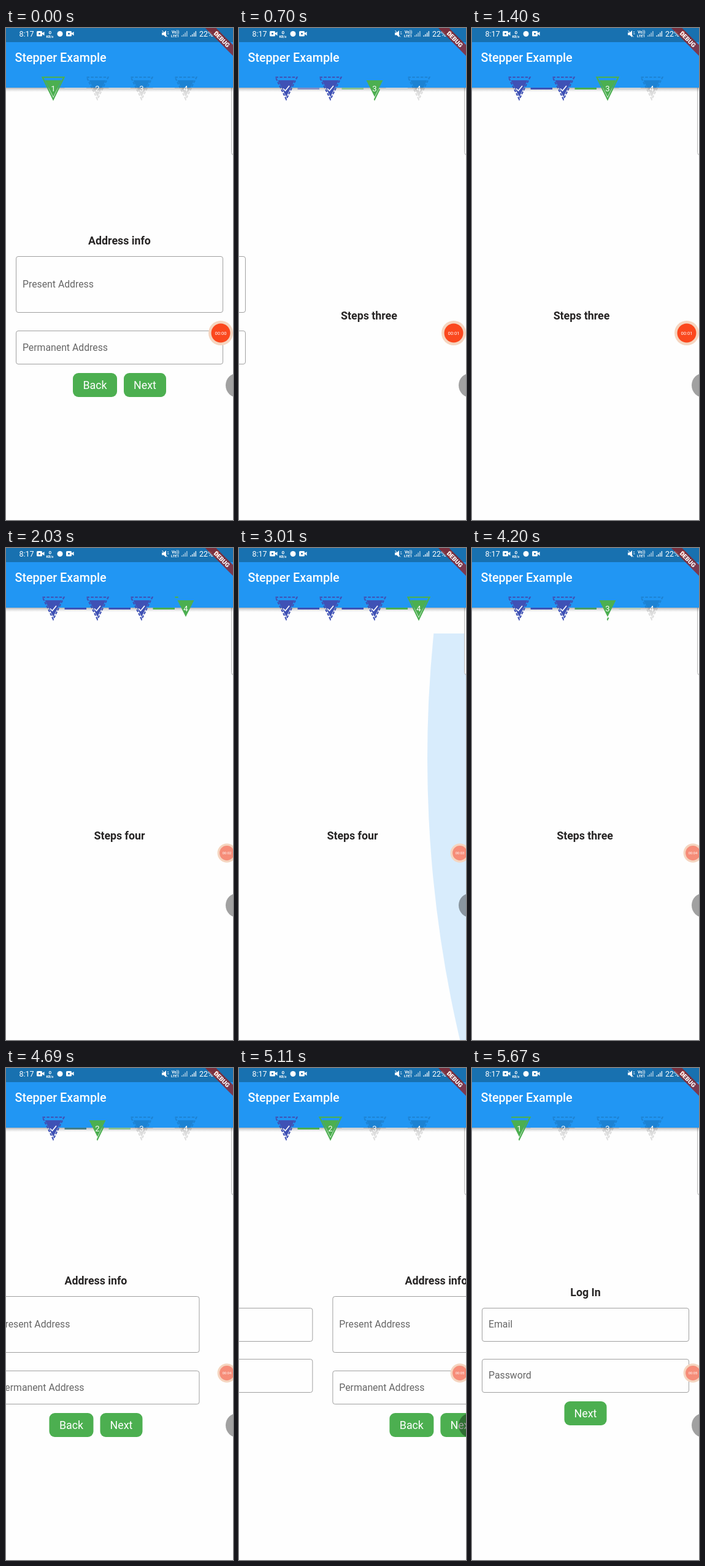
An HTML page that plays this animation: 370 by 800 pixels, repeating every 5.74 s.

```html
<!DOCTYPE html>
<html lang="en">
<head>
<meta charset="utf-8">
<title>Stepper Example</title>
<style>
html, body { margin: 0; width: 100%; height: 100%; overflow: hidden; background: #fefefe; }
svg { display: block; width: 370px; height: 800px; font-family: Roboto, sans-serif; }
.head { font-size: 17.8px; font-weight: 700; fill: #262424; text-anchor: middle; }
.label { font-size: 15.8px; fill: #666; }
.field { fill: none; stroke: #a0a0a0; }
.btn { fill: #4caf50; }
.btn-text { font-size: 17.8px; fill: #fff; text-anchor: middle; }
.num { font-size: 13px; fill: #fff; text-anchor: middle; }
.tick { fill: none; stroke: #fff; stroke-width: 1.6; }
.status { fill: #fff; font-size: 12.5px; }
.tiny { font-size: 5.5px; font-weight: 700; }
</style>
</head>
<body>
<svg viewBox="0 0 370 800">
  <defs>
    <linearGradient id="shade" x2="0" y2="1">
      <stop offset="0" stop-opacity=".3"/>
      <stop offset=".4" stop-opacity=".13"/>
      <stop offset="1" stop-opacity="0"/>
    </linearGradient>
    <clipPath id="body"><path d="M0 139H370V800H0z"/></clipPath>
    <g id="camera" fill="#fff">
      <rect y="5" width="9" height="8.5" rx="1.5"/>
      <path d="M8 9l4.500-3v6.500z"/>
      <circle cx="4.500" cy="9.200" r="1.500" fill="#1871b0"/>
    </g>
    <path id="bars" d="M0 14v-2h1.500v2zM2.700 14v-4h1.500v4zM5.400 14V7.500h1.500V14zM8.100 14V5h1.500v9z"/>
  </defs>
  <rect width="370" height="800" fill="#fefefe"/>
  <g id="pages"></g>
  <g clip-path="url(#body)"><circle id="glow" cy="342" r="2000" fill="#2196f3"/></g>
  <rect x="367.500" y="80" width="20" height="126.500" rx="4" fill="#fefefe" stroke="#b5b5b5"/>

  <rect y="97" width="370" height="7" fill="url(#shade)"/>
  <rect width="370" height="97" fill="#2196f3"/>
  <rect width="370" height="23" fill="#1871b0"/>
  <text x="14.500" y="55" fill="#fff" font-size="19.700" font-weight="500">Stepper Example</text>
  <g id="stepper"></g>

  <g class="status">
    <text x="21.500" y="14">8:17</text>
    <use href="#camera" x="50"/>
    <text class="tiny" x="69.500" y="9.500" style="font-size:8px">0</text>
    <text class="tiny" x="65.500" y="15.500">KB/s</text>
    <circle cx="88" cy="9.500" r="4.500"/>
    <use href="#camera" x="98"/>
    <path d="M254 7.500h3l4-3.500v11l-4-3.500h-3z"/>
    <path d="M254.500 4l8.500 10.500M263 6.500l2 0M263 9.500h2.500" fill="none" stroke="#fff"/>
    <text class="tiny" x="270" y="9" style="font-size:6.500px">Vo))</text>
    <text class="tiny" x="269" y="15" style="font-size:6px">LTE1</text>
    <use href="#bars" x="286" opacity=".6"/>
    <use href="#bars" x="300.500" opacity=".85"/>
    <text x="315" y="13.500">22%</text>
    <rect x="341" y="5" width="6" height="9.500" rx="1"/>
  </g>
  <g transform="translate(370 0) rotate(45)">
    <rect x="-50" y="19.500" width="100" height="12.500" fill="#961c1c" fill-opacity=".76"/>
    <text y="29.300" fill="#fff" font-size="10" font-weight="900" text-anchor="middle">DEBUG</text>
  </g>

  <circle cx="378" cy="581" r="20" fill="#000" fill-opacity=".37"/>
  <g id="timer">
    <circle r="20" fill="#f5d5c0"/>
    <circle id="dot" r="15.500"/>
    <text id="clock" y="2.700" fill="#fff" font-size="7.600" text-anchor="middle"></text>
  </g>
</svg>
<script>
const LOOP = 5740, TICK = 70, SWIPE = 650, HALF = 295;
const GREEN = [76, 175, 80], INDIGO = [63, 81, 181], GREY = [207, 211, 214];
const $ = id => document.getElementById(id);
const rgb = c => `rgb(${c.map(Math.round)})`;
const clamp = x => Math.min(1, Math.max(0, x));
const mix = (a, b, k) => a.map((v, i) => v + (b[i] - v) * k);

// Start time, direction and resulting step of each swipe
const swipes = [
  [204, 1, 2], [1350, 1, 3], [3596, -1, 2], [4217, -1, 1], [4865, -1, 0]
];

// Piecewise linear track of [time, ...values]
function track(keys, t) {
  if (t <= keys[0][0]) return keys[0].slice(1);
  for (let i = 1; i < keys.length; i++) {
    const [a, ...from] = keys[i - 1], [b, ...to] = keys[i];
    if (t < b) return mix(from, to, (t - a) / (b - a));
  }
  return keys[keys.length - 1].slice(1);
}

const head = (text, y) => `<text class="head" x="185" y="${y}">${text}</text>`;
const field = (label, y, h, base) =>
  `<rect class="field" x="16.500" y="${y + .5}" width="337" height="${h}" rx="3.500"/>` +
  `<text class="label" x="27" y="${base}">${label}</text>`;
const button = (text, x, y, w) =>
  `<rect class="btn" x="${x}" y="${y}" width="${w}" height="39" rx="9"/>` +
  `<text class="btn-text" x="${x + w / 2}" y="${y + 25.8}">${text}</text>`;

$('pages').innerHTML = [
  head('Log In', 371) + field('Email', 390, 54, 421.5) +
    field('Password', 473, 54, 505) + button('Next', 150.5, 542, 69),
  head('Address info', 352) + field('Present Address', 371, 91, 421.5) +
    field('Permanent Address', 492, 54, 524.5) +
    button('Back', 109, 561, 72) + button('Next', 192, 561, 69),
  head('Steps three', 474),
  head('Steps four', 474)
].map((html, i) => `<g transform="translate(${i * 370} 0)">${html}</g>`).join('');

$('stepper').innerHTML =
  [0, 1, 2].map(i => `<rect class="line" x="${95.5 + 72 * i}" y="97" width="35.500" height="3"/>`).join('') +
  [0, 1, 2, 3].map(i => `<g class="step" transform="translate(${77 + 72 * i} 0)">
    <path d="M-13.500 85H13.500L0 112z"/>
    <path d="M-17.500 80H17.500L0 116z" fill="none" stroke-width="2.200"/>
    <text class="num" y="102.500">${i + 1}</text>
    <path class="tick" d="M-5 98.500l3.500 3.500L5 94"/></g>`).join('');

const lines = [...document.querySelectorAll('.line')];
const steps = [...document.querySelectorAll('.step')].map(g => g.children);

const PERIMETER = 115.06;
// Drawn part of the active outline by age, clockwise from the top left
const outline = [
  [0, .3, .66], [180, .45, .66], [205, .5, .66], [339, .66, .66],
  [340, 0, 0], [400, 0, .06], [510, .04, .66], [600, 0, 1]
];

const lineColor = (i, active) => i + 1 < active ? INDIGO : i + 1 === active ? GREEN : GREY;

function drawStepper(active, before, age) {
  lines.forEach((el, i) =>
    el.setAttribute('fill', rgb(mix(lineColor(i, before), lineColor(i, active), clamp(age / 380)))));

  steps.forEach(([fill, edge, num, tick], i) => {
    const done = i < active, on = i === active;
    const color = done ? rgb(INDIGO) : on ? rgb(GREEN) : 'rgba(0,0,0,.13)';
    fill.setAttribute('fill', color);
    edge.setAttribute('stroke', color);
    let dash = '4.5 2.3';
    if (on) {
      const [a, b] = track(outline, age);
      dash = b - a > .99 ? 'none' : `0 ${a * PERIMETER} ${(b - a) * PERIMETER} 300`;
    }
    edge.setAttribute('stroke-dasharray', dash);
    num.setAttribute('visibility', done ? 'hidden' : 'visible');
    tick.setAttribute('visibility', done ? 'visible' : 'hidden');
  });
}

function draw(t) {
  let page = 1, active = 0, before = 0, age = LOOP;
  for (const [start, dir, step] of swipes) {
    const u = clamp((t - start) / SWIPE);
    page += dir * (1 - (1 - u * u) ** 3);
    if (t >= start + HALF) {
      before = active;
      active = step;
      age = t - start - HALF;
    }
  }
  $('pages').setAttribute('transform', `translate(${-370 * page} 0)`);
  drawStepper(active, before, age);

  const [depth, alpha] = track([[2800, 0, 0], [3010, 63, .17], [3150, 68, .17], [3550, 0, 0]], t);
  $('glow').setAttribute('cx', 2370 - depth);
  $('glow').setAttribute('opacity', alpha);

  const dock = clamp((t - 1450) / 280);
  $('timer').setAttribute('transform', `translate(${350 + 10 * dock} 496) scale(${1 - .23 * dock})`);
  $('dot').setAttribute('fill', rgb(mix([251, 72, 30], [246, 141, 121], dock)));
  $('clock').textContent = '00:0' + Math.floor((t + 305) / 1000);
}

const origin = performance.now();
function frame() {
  const t = (performance.now() - origin) % LOOP;
  draw(Math.floor(t / TICK) * TICK);
  requestAnimationFrame(frame);
}
frame();
</script>
</body>
</html>
```
